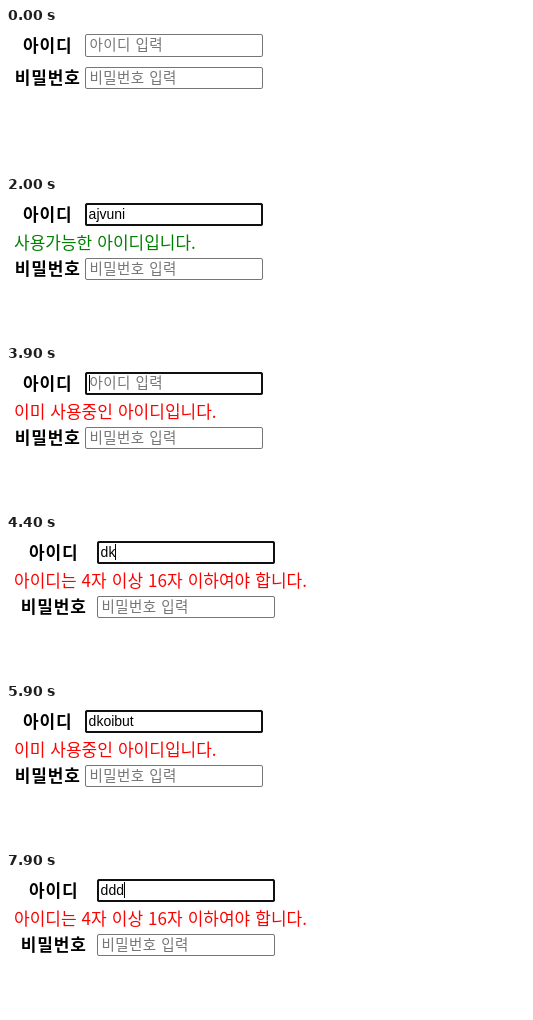
An HTML page for the animation above (8 s loop, 521 px wide and 141 px high).

```html
<!DOCTYPE html>
<html lang="ko">
<head>
<meta charset="utf-8">
<title>아이디 확인</title>
<style>
  html, body { margin: 0; width: 100%; height: 100%; overflow: hidden; background: #fff; }
  svg { display: block; width: 521px; height: 141px; }
  text { font-family: "Noto Sans CJK KR", "Noto Sans CJK", sans-serif; white-space: pre; }
  .label { font-size: 17px; font-weight: 700; letter-spacing: 0.9px; text-anchor: middle; }
  .hint { font-size: 14.5px; font-weight: 300; letter-spacing: 0.45px; fill: #757575; }
  .typed { font: 14px "Liberation Sans", Arial, sans-serif; }
  .note { font-size: 17px; font-weight: 300; word-spacing: 0.3px; }
  .box { fill: #fff; stroke: #767676; }
  .box.hover { stroke: #4f4f4f; }
  .ring { fill: none; stroke: #101010; stroke-width: 2; }
</style>
</head>
<body>
<svg viewBox="0 0 521 141">
  <g id="labels">
    <text class="label" x="41.8" y="23.5">아이디</text>
    <text class="label" id="pwLabel" x="41.8" y="55.5">비밀번호</text>
  </g>
  <text class="note" id="note" x="8" y="51.5"></text>
  <g id="fields">
    <rect class="box" id="idBox" x="79.5" y="6.5" width="177" height="22" rx="1.5"/>
    <rect class="ring" id="ring" x="80" y="7" width="176" height="21" rx="1.5"/>
    <rect id="mark" x="83" y="9" width="46" height="16" fill="#0078d7"/>
    <text class="hint" id="hint" x="83.5" y="22">아이디 입력</text>
    <text class="typed" id="typed" x="82.6" y="22"></text>
    <rect id="caret" y="9" width="1" height="16" shape-rendering="crispEdges"/>
    <g id="pwField">
      <rect class="box" x="79.5" y="39.5" width="177" height="21" rx="1.5"/>
      <text class="hint" x="83.5" y="54.5">비밀번호 입력</text>
    </g>
  </g>
</svg>
<script>
const LOOP = 8000;
const NOTES = {
  none: ['', 'red'],
  length: ['아이디는 4자 이상 16자 이하여야 합니다.', 'red'],
  free: ['사용가능한 아이디입니다.', 'green'],
  taken: ['이미 사용중인 아이디입니다.', 'red']
};
const FIRST = 'ajvuni1234', SECOND = 'dkoibut';

const start = { text: '', note: 'none', hover: false, focus: false, caret: false, selected: false };
const steps = [[0, start]];
const at = (time, change) => steps.push([time, change]);
const type = (time, word, count, more) =>
  at(time, { text: word.slice(0, count), caret: true, selected: false, ...more });

at(100, { hover: true });
at(400, { focus: true, caret: true });

type(700, FIRST, 1);
at(900, { note: 'length' });
type(1000, FIRST, 2);
type(1100, FIRST, 3);
type(1200, FIRST, 4);
at(1300, { note: 'free' });
type(1400, FIRST, 5);
type(1500, FIRST, 6);
at(2000, { caret: false });
type(2100, FIRST, 7);
type(2200, FIRST, 8);
type(2400, FIRST, 9);
type(2700, FIRST, 10);
at(2800, { note: 'taken' });
at(3100, { caret: false });

// Backspace held down
type(3400, FIRST, 9, { caret: false });
type(3600, FIRST, 8);
type(3700, FIRST, 5);
type(3800, FIRST, 2);
type(3900, FIRST, 0);
at(4000, { note: 'none' });
at(4100, { caret: false });

type(4300, SECOND, 1);
type(4400, SECOND, 2, { note: 'length' });
type(4600, SECOND, 3);
type(4700, SECOND, 4);
at(4800, { note: 'free' });
type(5000, SECOND, 5);
type(5200, SECOND, 6);
type(5400, SECOND, 7);
at(5500, { note: 'taken' });
at(5900, { caret: false });
at(6300, { selected: true });

type(6500, 'ddd', 1);
at(6700, { note: 'length' });
type(6800, 'ddd', 2);
type(6900, 'ddd', 3);
type(7100, 'ddd', 2);
type(7200, 'ddd', 1);
type(7600, 'ddd', 2);
type(7900, 'ddd', 3);

const $ = id => document.getElementById(id);
const show = (id, on) => $(id).setAttribute('visibility', on ? 'visible' : 'hidden');
const move = (id, x, y) => $(id).setAttribute('transform', `translate(${x} ${y})`);

function draw(s) {
  const [message, color] = NOTES[s.note];
  const wide = s.note === 'length';
  const drop = message ? 22 : 0;
  $('note').textContent = message;
  $('note').setAttribute('fill', color);
  move('labels', wide ? 6 : 0, 0);
  move('fields', wide ? 12 : 0, 0);
  move('pwLabel', 0, drop);
  move('pwField', 0, drop);

  $('idBox').classList.toggle('hover', s.hover);
  $('typed').textContent = s.text;
  $('typed').setAttribute('fill', s.selected ? '#fff' : '#000');
  const width = s.text ? $('typed').getComputedTextLength() : 0;
  $('caret').setAttribute('x', Math.floor(83 + width));
  show('ring', s.focus);
  show('hint', !s.text);
  show('mark', s.selected);
  show('caret', s.caret);
}

let shown = -1;
function tick() {
  const time = performance.now() % LOOP;
  const past = steps.filter(([t]) => t <= time);
  if (past.length !== shown) {
    shown = past.length;
    draw(Object.assign({}, ...past.map(([, change]) => change)));
  }
  requestAnimationFrame(tick);
}
tick();
</script>
</body>
</html>
```
